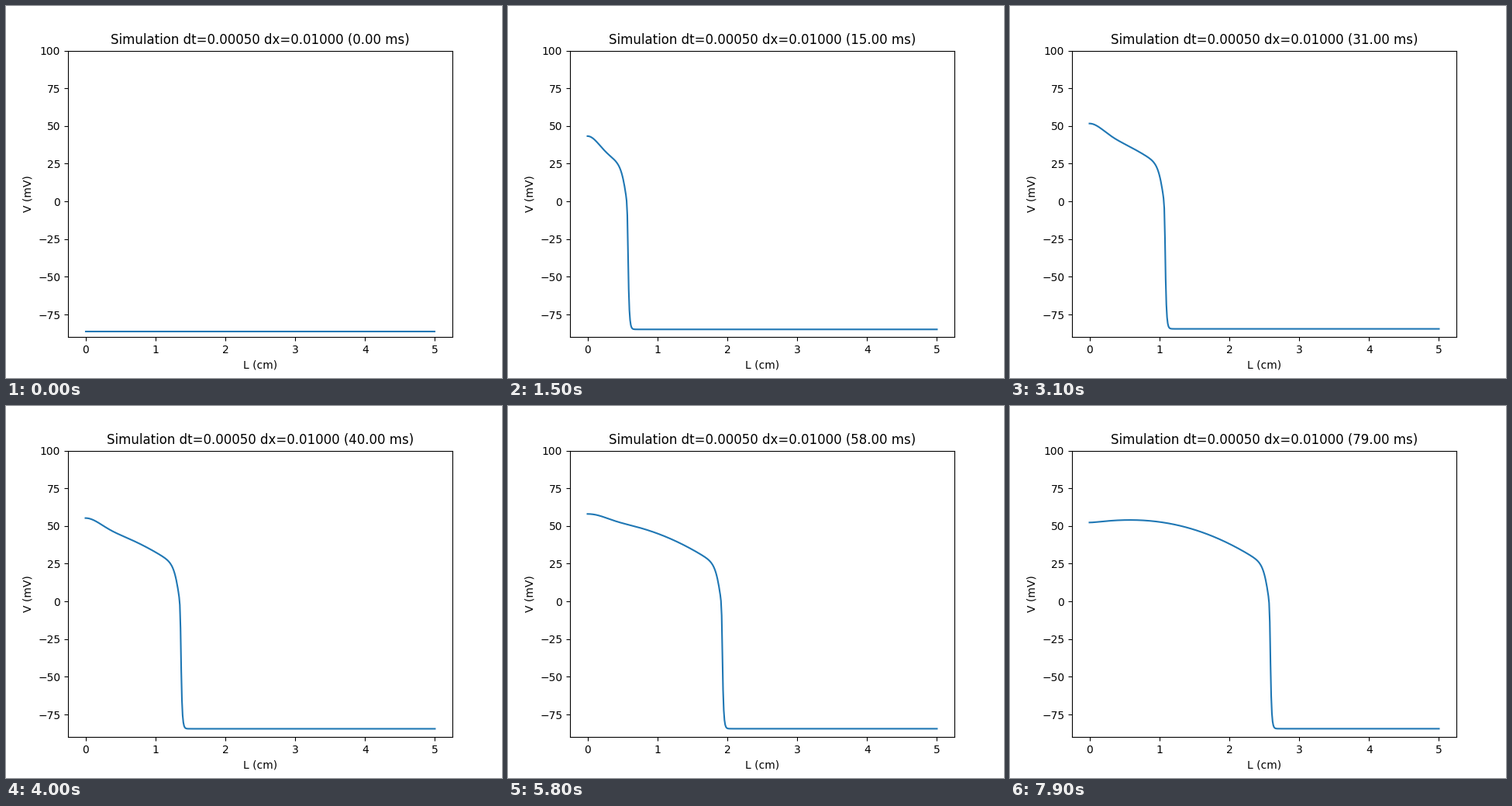
A matplotlib script for the animation above (8 s loop, 640 by 480 pixels).

```python
import numpy as np
import matplotlib.pyplot as plt
from matplotlib.animation import FuncAnimation

FRAMES = 80
INTERVAL = 100
REST = -84.45    # mV, settled resting potential
PEAK = 54.0      # mV, top of the plateau
PEAK_LAG = 2.0   # cm behind the front
SPEED = 0.0313   # cm/ms
START = 0.113    # cm


def wave(s):
    """Potential at distance s behind the travelling front."""
    upstroke = (1 + np.exp(-225 * (s - 0.002))) ** (-1 / 3)
    s = np.maximum(s, 0)
    d = PEAK_LAG - s
    plateau = PEAK - d ** 2 * (7 + 0.9 * d - 0.2 * d ** 2)
    knee = 25 * np.exp(-(s / 0.067) ** 1.3)
    return REST + (plateau - knee - REST) * upstroke


def end_bump(x, t):
    """Extra potential near the stimulated end, fading with time."""
    height = 5.3 * (1 - (t / 79) ** 5) + 5 * np.exp(-(t / 14.5) ** 2)
    width = 0.18 + 0.0027 * t
    return height * np.exp(-(x / width) ** 2.2)


def potential(x, t):
    drift = -1.75 * np.exp(-t / 11)
    behind = START + SPEED * t - np.hypot(x, 0.08)  # no-flux end at x = 0
    v = wave(behind)
    v = v + drift * np.clip(v / REST, 0, 1) + end_bump(x, t)
    rest = REST + drift
    return rest + (v - rest) * (1 - np.exp(-t / 0.9))


x = np.linspace(0, 5, 501)
fig, ax = plt.subplots(figsize=(6.4, 4.8), dpi=100)
line, = ax.plot(x, potential(x, 0.0))
ax.set_xlim(-0.25, 5.25)
ax.set_ylim(-90, 100)
ax.set_xlabel("L (cm)")
ax.set_ylabel("V (mV)")
title = ax.set_title("")


def update(i):
    t = float(i)
    line.set_ydata(potential(x, t))
    title.set_text(f"Simulation dt=0.00050 dx=0.01000 ({t:.2f} ms)")
    return line, title


anim = FuncAnimation(fig, update, frames=FRAMES, interval=INTERVAL,
                     repeat=True, repeat_delay=0, blit=False)
plt.show()
```
